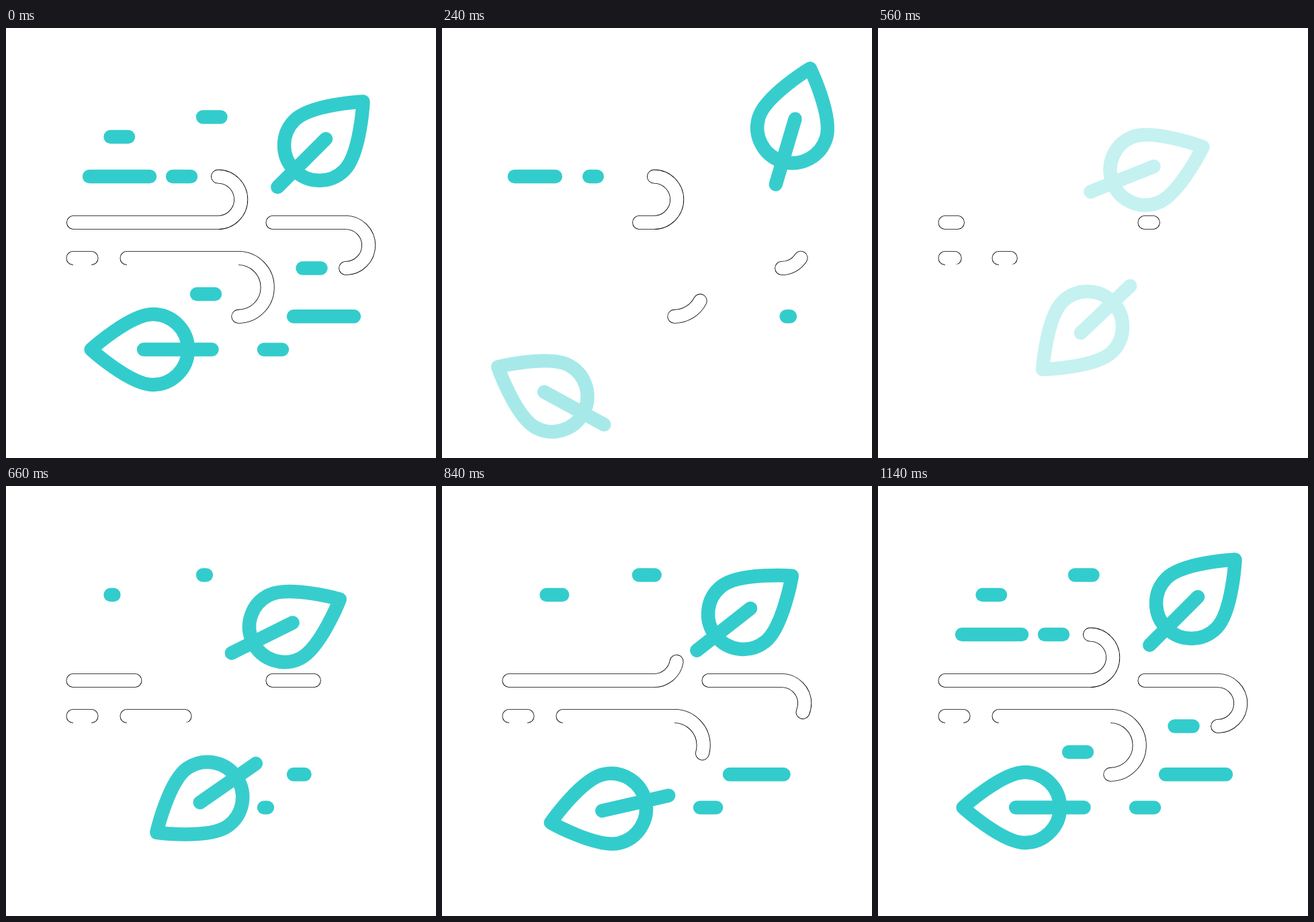
An HTML page with a canvas for the animation above (1.16 s loop, 640 by 640 pixels).

```html
<!DOCTYPE html>
<html lang="en">
<head>
<meta charset="utf-8">
<title>Wind and leaves</title>
<style>
  html, body { margin: 0; height: 100%; overflow: hidden; background: #fff; }
  canvas { display: block; }
</style>
</head>
<body>
<canvas id="stage" width="640" height="640"></canvas>
<script>
const ctx = document.getElementById('stage').getContext('2d');
const LOOP = 1160, STEP = 20, TURN = 470; // before TURN things leave, after it they return
const TEAL = '#33cccc', WIDTH = 20.4, DRIFT = 50;

const ramp = (t, a, b) => Math.min(1, Math.max(0, (t - a) / (b - a)));
const ease = (t, [a, b]) => { const u = ramp(t, a, b); return u * u * (3 - 2 * u); };
const bezier = (p, a, b, c, d) => {
  const q = 1 - p;
  return q * q * q * a + 3 * q * q * p * b + 3 * q * p * p * c + p * p * p * d;
};

// Gusts: a straight run, then a half circle of radius r turning up (-1) or down (1)
const gusts = [
  { x: 100, end: 315.5, y: 289.5, r: 34.2, turn: -1, out: [-10, 431], in: [490, 973] },
  { x: 397, end: 505.7, y: 289.5, r: 34, turn: 1, out: [0, 320], in: [490, 973] },
  { x: 180, end: 345.8, y: 342.5, r: 43.4, turn: 1, out: [0, 320], in: [490, 973] },
  { x: 100, end: 127, y: 342.5, r: 0, turn: 1, out: [0, 130], in: [490, 626] }
];

const MID = [566, 909], LATE = [842, 1070];
const dashes = [
  { x: 155.5, len: 26.5, y: 162, out: [0, 140], in: MID },
  { x: 293, len: 26.5, y: 132.5, out: [0, 181], in: MID },
  { x: 124, len: 90, y: 221, out: [111, 451], in: [842, 1159], mode: 'drift' },
  { x: 248, len: 27, y: 221, out: [130, 330], in: LATE, mode: 'drift' },
  { x: 441.5, len: 27, y: 357.5, out: [0, 232], in: LATE },
  { x: 284, len: 27, y: 396, out: [0, 232], in: LATE },
  { x: 428, len: 90, y: 429.3, out: [0, 282], in: MID, mode: 'forward' },
  { x: 384, len: 27, y: 478.6, out: [0, 232], in: MID }
];

// Each leaf flies away from its rest pose along one curve and returns along another
const leaves = [
  {
    angle: 135, fade: [236, 381],
    away: { x: [466.5, 503.2, 527.1, 538.3], y: [174.5, 171.8, 152.5, 116.6], spin: -44 },
    back: { x: [466.5, 445.2, 425.2, 393.2], y: [174.5, 193.5, 214.7, 210.6], spin: 24.5 }
  },
  {
    angle: 0, fade: [158, 301],
    away: { x: [218.5, 215.2, 173.7, 94.1], y: [478.5, 537.4, 560.8, 548.7], spin: 44 },
    back: { x: [218.5, 256.6, 301.7, 313.7], y: [478.5, 483.3, 482.7, 438.1], spin: -46 }
  }
];

const leafShape = new Path2D(
  'M-92 0C-92 0-34-52.5 0-52.5A52.5 52.5 0 0 1 0 52.5C-34 52.5-92 0-92 0ZM-13.5 0H88');

function drawGust(g, t) {
  const total = g.end - g.x + Math.PI * g.r;
  const from = t < TURN ? total * ease(t, g.out) : 0;
  const to = t < TURN ? total : total * ease(t, g.in);
  if (to - from < 0.01) return;
  ctx.beginPath();
  ctx.moveTo(g.x, g.y);
  ctx.lineTo(g.end, g.y);
  if (g.r) {
    const quarter = g.turn * Math.PI / 2;
    ctx.arc(g.end, g.y + g.turn * g.r, g.r, -quarter, quarter, g.turn < 0);
  }
  ctx.setLineDash([to - from, 2000]);
  ctx.lineDashOffset = -from;
  for (const [color, width] of [['#000', 21], ['#fff', 19.3]]) {
    ctx.strokeStyle = color;
    ctx.lineWidth = width;
    ctx.stroke();
  }
  ctx.setLineDash([]);
}

function drawDash({ x, len, y, mode, ...span }, t) {
  let left = x, right = x + len;
  if (t < TURN) {
    const k = ease(t, span.out);
    if (mode === 'drift') {
      left -= DRIFT * k;
      right -= (len + DRIFT) * k;
    } else if (mode === 'forward') left += len * k;
    else right -= len * k;
  } else {
    const rest = len * (1 - ease(t, span.in));
    if (mode === 'drift') left += rest;
    else right -= rest;
  }
  if (right - left < 0.01) return;
  ctx.beginPath();
  ctx.moveTo(left, y);
  ctx.lineTo(right, y);
  ctx.stroke();
}

function drawLeaf({ angle, fade, away, back }, t) {
  const leaving = t < TURN;
  const alpha = leaving ? 1 - ramp(t, ...fade) : ramp(t, 519, 664);
  if (alpha < 0.2) return; // faint leaves are cut off
  const route = leaving ? away : back;
  const p = leaving ? ease(t, [0, 400]) : 1 - ease(t, [485, 1031]);
  ctx.save();
  ctx.globalAlpha = alpha;
  ctx.translate(bezier(p, ...route.x), bezier(p, ...route.y));
  ctx.rotate((angle + route.spin * p) * Math.PI / 180);
  ctx.stroke(leafShape);
  ctx.restore();
}

function draw(t) {
  ctx.fillStyle = '#fff';
  ctx.fillRect(0, 0, 640, 640);
  ctx.lineCap = ctx.lineJoin = 'round';
  gusts.forEach(g => drawGust(g, t));
  // The lower gusts have no bottom edge
  ctx.fillRect(180, 351.5, 166, 2);
  ctx.fillRect(100, 351.5, 27, 2);
  ctx.strokeStyle = TEAL;
  ctx.lineWidth = WIDTH;
  dashes.forEach(d => drawDash(d, t));
  leaves.forEach(l => drawLeaf(l, t));
}

const start = performance.now();
function tick() {
  const t = (performance.now() - start) % LOOP;
  draw(Math.floor(t / STEP) * STEP);
  requestAnimationFrame(tick);
}
tick();
</script>
</body>
</html>
```
